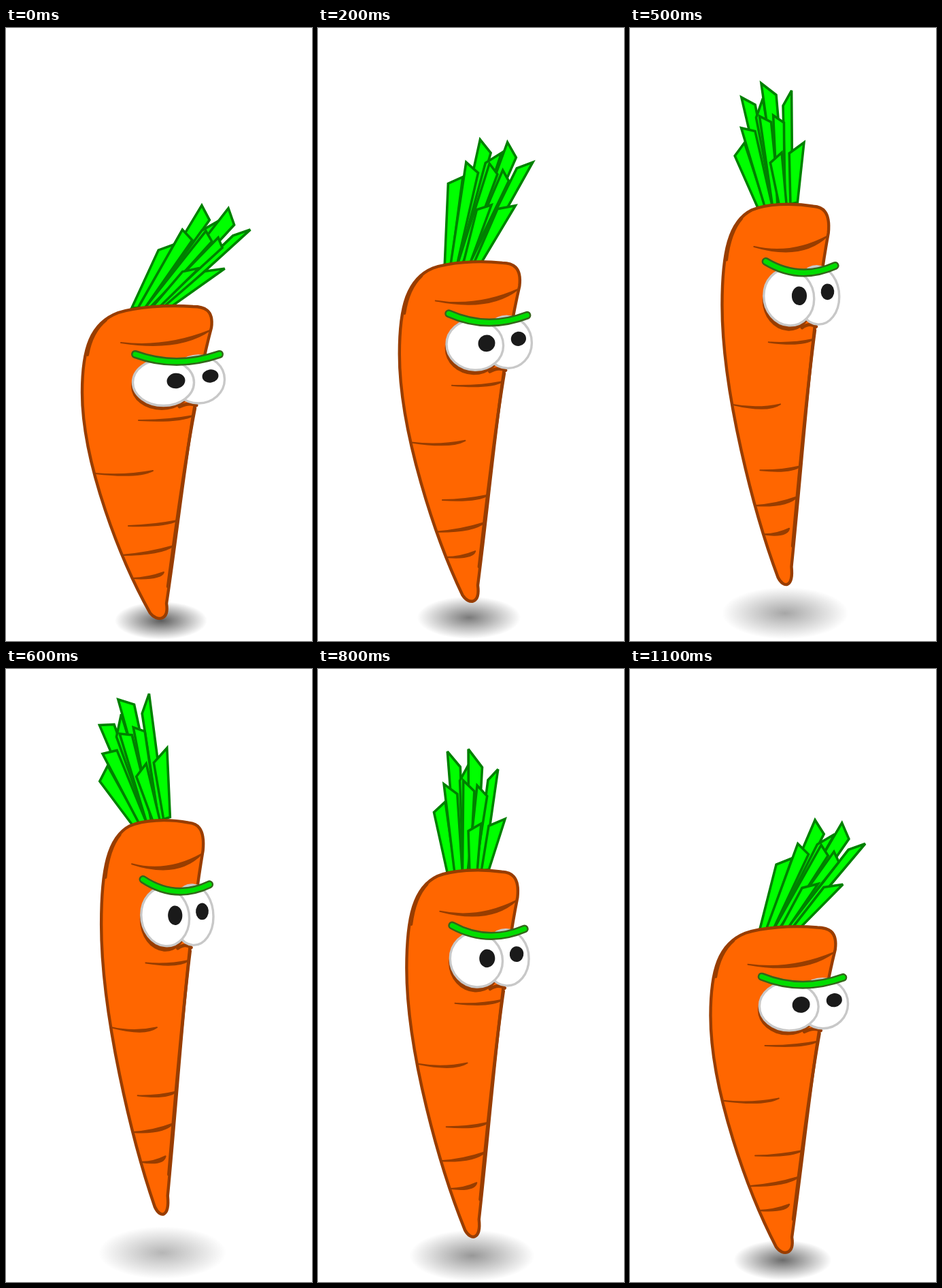
An HTML page with a canvas that plays this animation: 450 by 900 pixels, repeating every 1200 ms.

```html
<!DOCTYPE html>
<html lang="en">
<head>
<meta charset="utf-8">
<title>Bouncing carrot</title>
<style>
html, body { margin: 0; width: 100%; height: 100%; overflow: hidden; background: #fff; }
canvas { display: block; }
</style>
</head>
<body>
<canvas id="stage" width="450" height="900"></canvas>
<script>
const ctx = document.getElementById('stage').getContext('2d');
const ORANGE = '#ff6600', BROWN = '#983d00', STEP = 100, COUNT = 12;

// The carrot in its squashed form; stretching is one affine map.
const body = new Path2D(`M302 440C306 413 290 409 275 409C235 406 190 410 165 418
  C125 433 112 470 112 535C112 640 170 785 212 859C222 872 240 870 236 845C258 700 270 560 302 440Z`);
const edge = new Path2D('M278 558Q262 640 238 820');
const cheek = new Path2D('M120 480Q126 446 147 429');
const lid = new Path2D('M255 556Q269 549 280 554');
const brow = new Path2D('M190 479Q250 501 314 479');

// Start, end and sag of each crease.
const creases = [
  [169, 462, 300, 444, 17], [195, 576, 276, 569, 4], [131, 654, 216, 650, 6],
  [180, 731, 252, 723, 3], [170, 774, 247, 760, 4], [185, 808, 232, 799, 4]
];

// Root share, left tip and right tip of each upright leaf, back leaf first.
const leaves = [
  [.3, 239, 160, 255, 180], [.45, 247, 195, 271, 180], [.58, 280, 164, 293, 187],
  [.75, 294, 203, 318, 194], [.09, 191, 226, 213, 216], [.25, 218, 194, 236, 210],
  [.43, 253, 196, 265, 212], [.55, 273, 206, 282, 222], [.88, 265, 264, 292, 259],
  [.6, 234, 265, 256, 258]
];

// Tuft swing from right to left: foot, then x by u, v, uv and y by u, v, vv, uv.
const swings = [
  [214, 408, 1.14, .248, -.0008, 0, .47, .0018, 0],
  [210, 348, 1, 0, 0, 0, 1, 0, 0],
  [219.5, 297, 1.22, -.27, -.0027, .22, .46, .0025, 0],
  [212, 222, 1.06, -.5, -.0024, .35, .6, 0, .00364]
];

// shift x, shift y, swing, tuft shift, shadow x, shadow radius
const poses = [
  [0, 0, 0, 0, 228, 68], [1.8, 1, .4, 4, 224.5, 72], [-1.6, -3, 1, 0, 222, 76],
  [-1, 4, 1.5, 0, 224, 84], [-.4, 11, 2, 0, 226.5, 92], [0, 5.5, 2.5, 0, 228, 93],
  [0, 0, 3, 0, 230, 94]
];

const mix = (a, b, t) => a.map((v, i) => v + (b[i] - v) * t);

function shadow(x, rx, t) {
  ctx.save();
  ctx.translate(x, 870 - 13 * t);
  ctx.scale(rx, rx * .41);
  const g = ctx.createRadialGradient(0, 0, 0, 0, 0, 1);
  g.addColorStop(0, `rgba(0,0,0,${.64 - .35 * t})`);
  g.addColorStop(1, 'rgba(0,0,0,0)');
  ctx.fillStyle = g;
  ctx.fillRect(-1, -1, 2, 2);
  ctx.restore();
}

function tuft(pos, dx) {
  const k = Math.min(Math.floor(pos), swings.length - 2);
  const [x0, y0, xu, xv, xuv, yu, yv, yvv, yuv] = mix(swings[k], swings[k + 1], pos - k);
  const bend = (u, v) => [x0 + dx + xu * u + xv * v + xuv * u * v,
    y0 - yu * u - yv * v - yvv * v * v - yuv * u * v];
  const tip = (x, y) => bend((x - 210) * .98, (348 - y) * .98);
  ctx.lineJoin = 'miter';
  ctx.miterLimit = 3;
  ctx.fillStyle = '#00ff00';
  ctx.strokeStyle = '#008000';
  ctx.lineWidth = 3.6;
  for (const [s, lx, ly, rx, ry] of leaves) {
    const u = s * 50 - 24;
    ctx.beginPath();
    ctx.moveTo(...bend(u - 4.5, -6));
    ctx.lineTo(...tip(lx, ly));
    ctx.lineTo(...tip(rx, ry));
    ctx.lineTo(...bend(u + 4.5, -6));
    ctx.closePath();
    ctx.fill();
    ctx.stroke();
  }
}

function carrot(t, dx, dy) {
  const map = new DOMMatrix([1 - .213 * t, .06 * t, 0, 1 + .262 * t, 52 * t + dx, dy - 307 * t]);
  // Lines keep their weight because only the path is stretched.
  const paint = (path, fill, line, width) => {
    const p = new Path2D();
    p.addPath(path, map);
    if (fill) { ctx.fillStyle = fill; ctx.fill(p); }
    if (line) { ctx.strokeStyle = line; ctx.lineWidth = width; ctx.stroke(p); }
  };
  const oval = (x, y, rx, ry, fill, line, turn = 0) => {
    const p = new Path2D();
    p.ellipse(x, y, rx, ry, turn, 0, Math.PI * 2);
    paint(p, fill, line, 3.4);
  };
  ctx.lineJoin = ctx.lineCap = 'round';

  paint(body, ORANGE, BROWN, 4.4);
  paint(edge, null, BROWN, 4.5);
  paint(cheek, null, BROWN, 4);
  for (const [x, y, ex, ey, sag] of creases) {
    const cx = (x + ex) / 2, cy = (y + ey) / 2 + sag, p = new Path2D();
    p.moveTo(x, y);
    p.quadraticCurveTo(cx, cy, ex, ey);
    p.quadraticCurveTo(cx + 20, cy + 2 + sag / 5, x, y);
    paint(p, BROWN, BROWN, 2);
  }

  oval(229, 526, 45, 35, BROWN);
  paint(lid, null, BROWN, 5);
  oval(283, 516, 38.5, 35, '#fff', '#c8c8c8');
  oval(231.5, 520.5, 45, 34, '#fff', '#c8c8c8');
  oval(250, 518, 13.5, 11.3, '#1a1a1a', null, -.15);
  oval(300.5, 511, 12, 9.7, '#1a1a1a', null, -.15);
  paint(brow, null, '#33661a', 12);
  paint(brow, null, '#00dd00', 7);
}

function draw(now) {
  const step = Math.floor(now / STEP) % COUNT;
  const i = Math.min(step, COUNT - step), t = i / 6;
  const [dx, dy, swing, tuftDx, shadeX, shadeR] = poses[i];
  ctx.fillStyle = '#fff';
  ctx.fillRect(0, 0, 450, 900);
  shadow(shadeX, shadeR, t);
  tuft(swing, tuftDx);
  carrot(t, dx, dy);
}

const start = performance.now();
function loop() {
  draw(performance.now() - start);
  requestAnimationFrame(loop);
}
loop();
</script>
</body>
</html>
```
